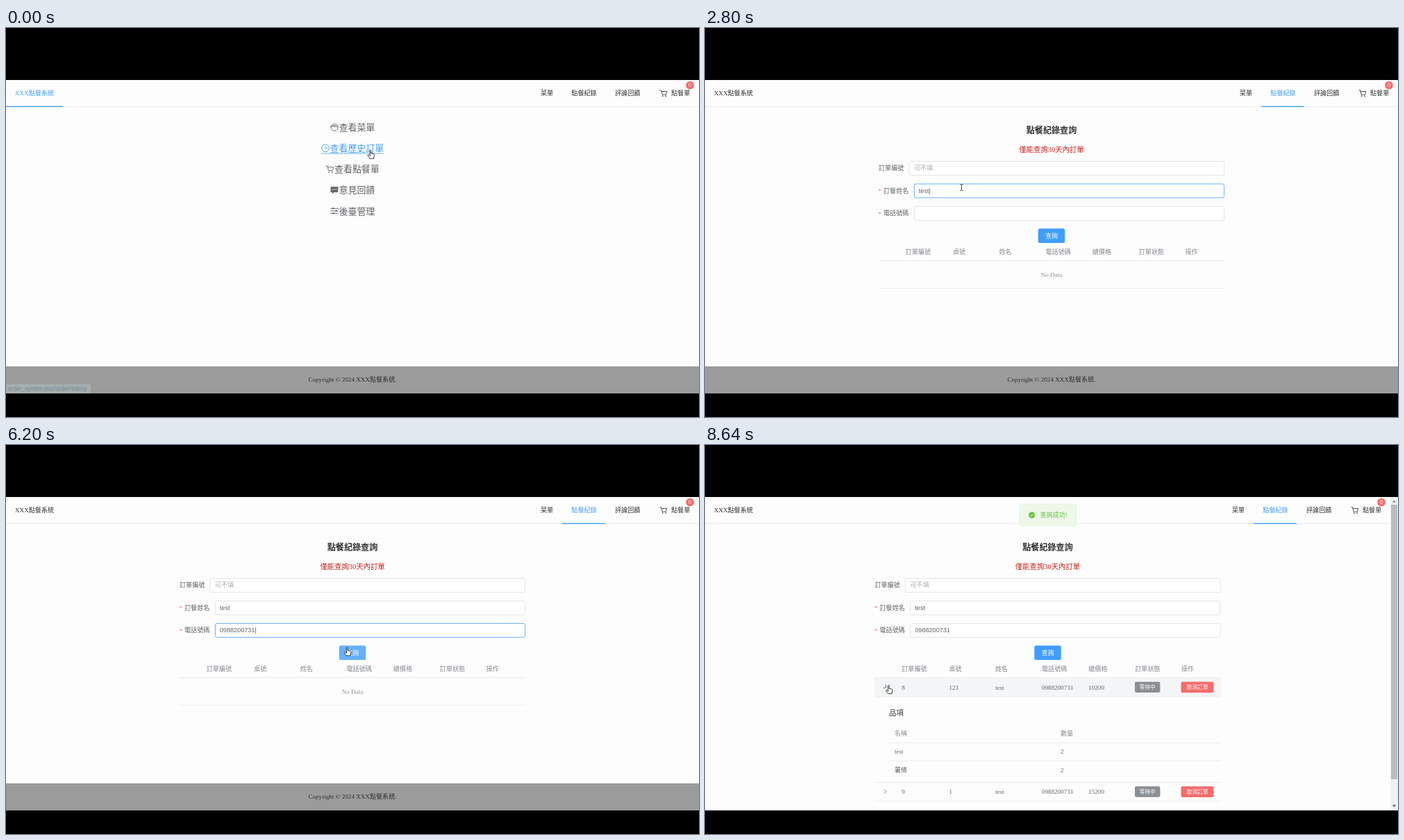
These frames come from a looping animation (998x561 px, 8680 ms). An HTML page:

```html
<!DOCTYPE html>
<html lang="zh-Hant">
<head>
<meta charset="utf-8">
<style>
  html, body { margin: 0; width: 100%; height: 100%; overflow: hidden; background: #000; }
  svg { display: block; width: 998px; height: 561px; }
  text { font-family: 'Liberation Serif', 'Noto Sans CJK TC', 'Noto Sans CJK', sans-serif; white-space: pre; }
  .sans { font-family: 'Liberation Sans', 'Noto Sans CJK TC', sans-serif; }
  .mid { text-anchor: middle; }
  .strong { font-weight: 700; }
  .line { fill: none; stroke-linecap: round; stroke-linejoin: round; }
</style>
</head>
<body>
<svg id="stage" viewBox="0 0 998 561">
  <defs><clipPath id="page"><rect y="75" width="998" height="452"/></clipPath></defs>
  <g id="scene" clip-path="url(#page)"></g>
  <g id="pointer"></g>
</svg>
<script>
const LOOP = 8680;
const BLUE = '#409eff', RED = '#f56c6c', DARK = '#303133', GREY = '#606266', PALE = '#909399';
const PHONE = '0988200731';

// Moments of the story, in ms
const OPEN = 400, FOCUS = 1400, TYPE_NAME = 2000, TAB = 3040, TYPE_PHONE = 4000;
const CLICK = 6640, LOADED = 6720, NOTICE = 6770, EXPAND = 8560;
const PATH = [[0, 525, 176], [480, 525, 176], [1300, 369.5, 230], [5450, 369.5, 230],
  [6300, 496, 294], [6900, 496, 294], [7500, 526, 296], [7700, 526, 296], [8400, 264.5, 346.5]];

const clamp = v => Math.max(0, Math.min(1, v));
const ease = v => v * v * (3 - 2 * v);
const progress = (t, start, length) => clamp((t - start) / length);

// Text is placed by its left edge (or middle) and its vertical centre
const text = (x, y, s, fill = GREY, size = 9.1, cls = '') =>
  `<text x="${x}" y="${y + size * .37}" fill="${fill}" font-size="${size}" class="${cls}">${s}</text>`;
const rect = (x, y, w, h, fill, r = 0, stroke = 'none') =>
  `<rect x="${x}" y="${y}" width="${w}" height="${h}" rx="${r}" fill="${fill}" stroke="${stroke}" stroke-width=".8"/>`;
const rule = (x1, x2, y) => rect(x1, y, x2 - x1, .8, '#e6e8ee');
const path = (d, stroke, width = .9, fill = 'none') =>
  `<path class="line" d="${d}" stroke="${stroke}" stroke-width="${width}" style="fill:${fill}"/>`;
const group = (x, y, body, extra = '', opacity = 1) =>
  `<g transform="translate(${x} ${y}) ${extra}" opacity="${opacity}">${body}</g>`;

// Icons are drawn around their centre, about 12 units wide
const ICONS = {
  bowl: c => path('M-5.3 -.8H5.3C5.3 2.5 3 4.6 2 5H-2C-3 4.6 -5.3 2.5 -5.3 -.8ZM-4.6 -1C-5 -3.2 -2.8 -4 -2 -3.6C-1 -5.4 2 -5.2 2.4 -3.5C4 -4 5 -2.6 4.6 -1M-2.5 -2.3H2.4', c),
  clock: c => path('M-5.3 0A5.3 5.3 0 1 1 5.3 0A5.3 5.3 0 1 1 -5.3 0M0 -3V.4H2.8', c),
  cart: c => path('M-5.5 -4.6H-3.7L-2 2.3H3.7L5.2 -2.7H-3.2', c) +
    `<circle cx="-1.4" cy="4.5" r=".9" fill="${c}"/><circle cx="3.3" cy="4.5" r=".9" fill="${c}"/>`,
  chat: c => path('M-4.8 -4.3H4.8V2.8H-.6L-2.8 5V2.8H-4.8Z', c, .8, c) +
    [-2.4, 0, 2.4].map(x => `<circle cx="${x}" cy="-.7" r=".75" fill="#fff"/>`).join(''),
  sliders: c => path('M-5.3 -3.5H5.3M-5.3 0H5.3M-5.3 3.5H5.3', c) +
    [[-2, -3.5], [2.5, 0], [-1.5, 3.5]].map(([x, y]) => `<circle cx="${x}" cy="${y}" r="1.2" fill="${c}"/>`).join(''),
};

const CURSORS = {
  hand: path('M-1 .8C-1 -.5 .8 -.5 .8 .8V4.8L4.3 5.5C5.3 5.8 5.6 6.4 5.4 7.4L4.7 11V12.2H-.7L-4 8C-4.5 7 -3.4 6.4 -2.7 7L-1 8.4Z', '#222', .9, '#fff'),
  arrow: path('M0 0V9.2L2.1 7.3L3.5 10.4L4.9 9.8L3.6 6.7H6.4Z', '#222', .8, '#fff'),
  beam: path('M-1.8 -4.5Q0 -4.5 0 -3.7Q0 -4.5 1.8 -4.5M0 -3.7V3.7M-1.8 4.5Q0 4.5 0 3.7Q0 4.5 1.8 4.5', '#333', .9),
};

function pointerAt(t) {
  let i = 1;
  while (i < PATH.length - 1 && PATH[i][0] < t) i++;
  const [t0, x0, y0] = PATH[i - 1], [t1, x1, y1] = PATH[i];
  const k = ease(progress(t, t0, t1 - t0));
  return [x0 + (x1 - x0) * k, y0 + (y1 - y0) * k];
}

const inside = ([px, py], x, y, w, h) => px > x && px < x + w && py > y && py < y + h;

function pointerKind(t, p) {
  if (t < OPEN || inside(p, 480, 289, 38, 21)) return 'hand';
  if (inside(p, 301, 192, 447, 21) || inside(p, 301, 224, 447, 21) || inside(p, 301, 257, 447, 21)) return 'beam';
  return t > LOADED && inside(p, 255, 336, 20, 54) ? 'hand' : 'arrow';
}

function header(t) {
  const k = ease(progress(t, OPEN, 300)) * 100;
  const tint = p => `color-mix(in srgb, ${BLUE} ${p}%, ${DARK})`;
  const underline = (x, w, p) => `<g opacity="${p / 100}">${rect(x, 112.6, w, 1.4, BLUE)}</g>`;
  const right = underline(801, 62, k) + text(770, 93.5, '菜單', DARK) +
    text(814.3, 93.5, '點餐紀錄', tint(k)) + text(877, 93.5, '評論回饋', DARK) +
    group(947, 94, ICONS.cart(DARK), 'scale(.92)') + text(958, 93.5, '點餐單', DARK) +
    `<circle cx="985" cy="82.6" r="5.9" fill="${RED}"/>` + text(985, 82.4, '0', '#fff', 7.8, 'mid');
  return rule(0, 998, 113.2) + underline(0, 82, 100 - k) +
    text(13, 94, 'XXX點餐系統', tint(100 - k)) + group(t < EXPAND ? 0 : -11, 0, right);
}

function home() {
  const items = [['bowl', '查看菜單'], ['clock', '查看歷史訂單'], ['cart', '查看點餐單'], ['chat', '意見回饋'], ['sliders', '後臺管理']];
  return items.map(([icon, label], i) => {
    const y = 143 + i * 30.2, left = 499 - (label.length + 1) * 6.5, color = i === 1 ? BLUE : GREY;
    return group(left + 6.5, y, ICONS[icon](color)) + text(left + 13, y, label, color, 12.95) +
      (i === 1 ? rect(left, y + 7.4, 91, .8, BLUE) : '');
  }).join('');
}

function field(t, x, y, value, p, from, to, lastKey) {
  const focused = t >= from && t < to;
  const border = focused ? BLUE : inside(p, x, y, 748 - x, 21) ? '#c0c4cc' : '#dcdfe6';
  const caret = focused && (t - lastKey) % 1000 < 500 ? '|' : '';
  return rect(x + .4, y + .4, 747.2 - x, 20, '#fff', 2.4, border) +
    text(x + 6.8, y + 10, value + caret, GREY, 9.1, 'sans');
}

function form(t, p) {
  const typed = (s, start, gap) => s.slice(0, Math.max(0, Math.floor((t - start) / gap) + 1));
  const name = typed('test', TYPE_NAME, 160), phone = typed(PHONE, TYPE_PHONE, 115);
  const last = (s, idle, start, gap) => s ? start + (s.length - 1) * gap : idle;
  const hover = inside(p, 480, 289, 38, 21);
  return text(499, 147.5, '點餐紀錄查詢', DARK, 12.1, 'mid strong') +
    text(499, 175, '僅能查詢30天內訂單', '#c8201c', 10.4, 'mid') +
    text(250, 202, '訂單編號') + text(257, 234.5, '訂餐姓名') + text(257, 267, '電話號碼') +
    text(249.5, 235, '*', RED) + text(249.5, 267.5, '*', RED) +
    field(t, 293.5, 192, '', p, 0, 0, 0) + text(301, 202, '可不填', '#a8abb2') +
    field(t, 301, 224.5, name, p, FOCUS, TAB, last(name, FOCUS, TYPE_NAME, 160)) +
    field(t, 301, 257, phone, p, TAB, CLICK, last(phone, TAB, TYPE_PHONE, 115)) +
    rect(479.8, 289.3, 38.5, 20.8, hover ? '#66b1ff' : BLUE, 2.6) + text(499, 299.5, '查詢', '#fff', 9.1, 'mid');
}

const COLUMNS = [288.7, 357, 423.5, 490.5, 557.7, 624.7, 691.5];
const cells = (y, words, fill) => words.map((s, i) => text(COLUMNS[i], y, s, fill)).join('');

function row(t, p, top, words, turn) {
  const y = top + 13.6, tag = ease(progress(t, NOTICE, 250));
  return (inside(p, 250, top, 498, 27) ? rect(249.5, top, 499, 27, '#f3f5f7') : '') +
    group(265.3, y - .3, path('M-1.4 -2.8L1.4 0L-1.4 2.8', GREY, .8), `rotate(${turn})`) + cells(y, words) +
    group(642.7, y, rect(-18.2, -7.7, 36.4, 15.4, '#8a8f94', 2.2) + text(0, 0, '等待中', '#fff', 7.8, 'mid'), `scale(${tag})`, tag) +
    rect(691, y - 7.7, 47, 15.6, RED, 2) + text(714.5, y, '取消訂單', '#fff', 7.8, 'mid') +
    rule(249.5, 748.5, top + 27);
}

function details() {
  return text(270.5, 386.5, '品項', DARK, 10.4) +
    [['名稱', '數量', PALE], ['test', '2', GREY], ['薯條', '2', GREY]].map(([a, b, c], i) =>
      text(278.5, 416 + i * 26.1, a, c) + text(517.5, 416 + i * 26.1, b, c) +
      (i < 2 ? rule(270.5, 748.5, 429.2 + i * 26.1) : '')).join('') +
    rule(249.5, 748.5, 486.2);
}

function table(t, p) {
  const head = cells(322.3, ['訂單編號', '桌號', '姓名', '電話號碼', '總價格', '訂單狀態', '操作'], '#85888e') + rule(249.5, 748.5, 335.2);
  if (t < LOADED) return head + text(499, 355.5, 'No Data', PALE, 9.1, 'mid') + rule(249.5, 748.5, 374.8);
  const open = t >= EXPAND;
  return head + row(t, p, 335.7, ['8', '123', 'test', PHONE, '10200'], progress(t, EXPAND, 200) * 90) +
    (open ? details() : '') + row(t, p, open ? 486.4 : 362.9, ['9', '1', 'test', PHONE, '15200'], 0);
}

function notice(t) {
  const k = ease(progress(t, NOTICE, 300));
  return group(0, (k - 1) * 32, rect(458, 85.4, 82, 31.2, '#eff7ea', 2.6, '#e1f3d8') +
    '<circle cx="476.2" cy="101" r="4.6" fill="#67c23a"/>' + path('M474 101L475.7 102.6L478.5 99.6', '#fff') +
    text(488, 100.8, '查詢成功!', '#67c23a'), '', k);
}

function scrollbar() {
  return rect(987, 75, 11, 452, '#f1f1f1') + rect(988, 86, 9, 396, '#bcbcbc') +
    path('M990.5 82.5L992.5 80L994.5 82.5Z', '#777', .3, '#777') + path('M990.5 519.5L992.5 522L994.5 519.5Z', '#444', .3, '#444');
}

const footer = () => rect(0, 488, 998, 39, '#9b9b9b') +
  text(499, 506.8, 'Copyright © 2024 XXX點餐系統.', DARK, 9.1, 'mid');
const linkHint = () => rect(0, 513.5, 122, 13.5, '#a5adad') +
  text(3, 520, 'order_system.test/orderHistory', '#708b94', 8.3, 'sans');

const scene = document.getElementById('scene'), pointer = document.getElementById('pointer');

function draw(now) {
  const t = now % LOOP, p = pointerAt(t), open = t >= EXPAND;
  const content = t < OPEN ? home() : form(t, p) + table(t, p) + notice(t);
  scene.innerHTML = rect(0, 74, 998, 454, '#fdfdfd') + header(t) + group(open ? -5.5 : 0, 0, content) +
    (open ? scrollbar() : footer()) + (t < OPEN ? linkHint() : '');
  pointer.innerHTML = group(...p, CURSORS[pointerKind(t, p)]);
  requestAnimationFrame(() => draw(performance.now()));
}
draw(0);
</script>
</body>
</html>
```
